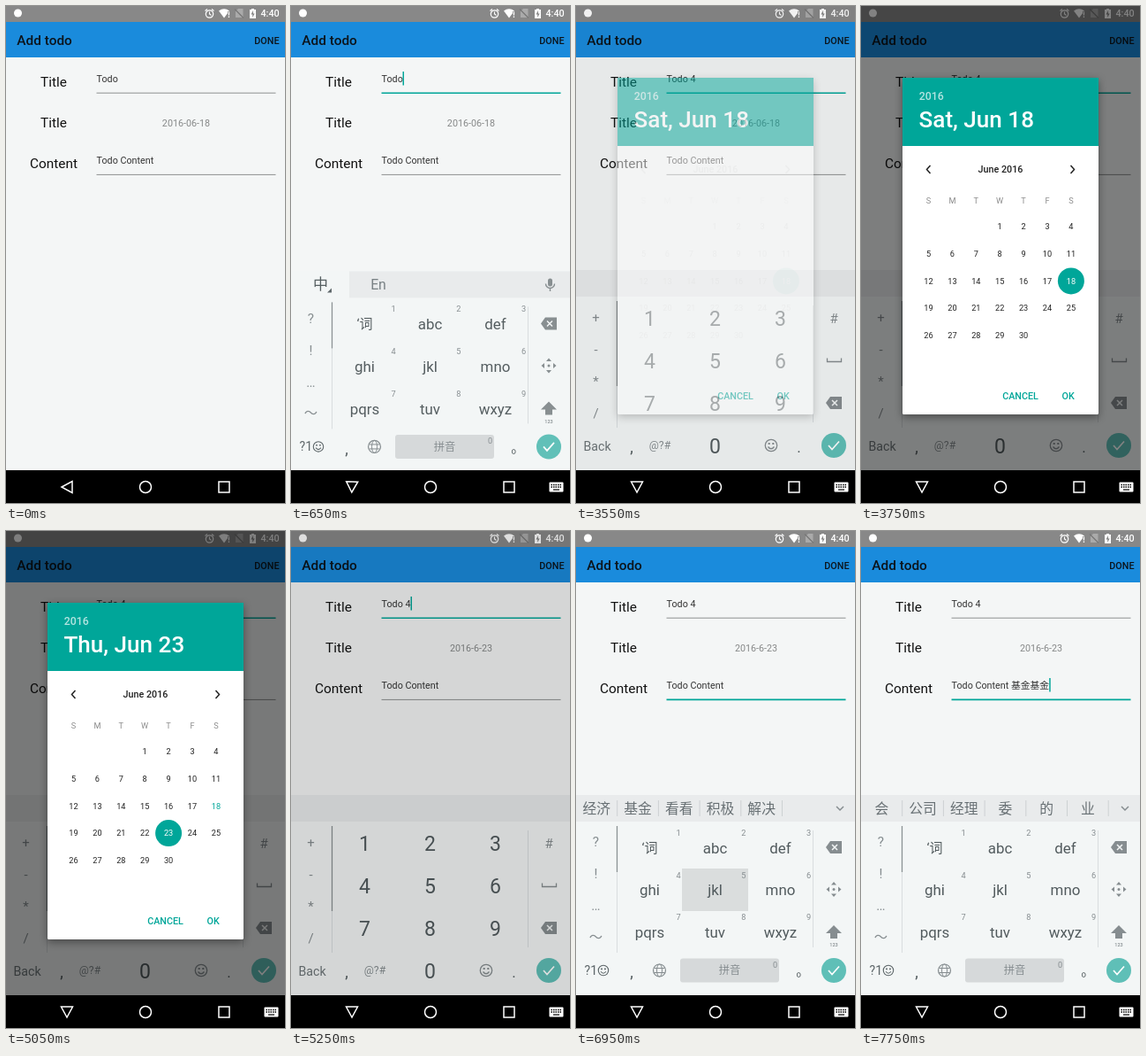
These frames come from a looping animation (316 by 561 pixels, 8 s). An HTML page:

```html
<!DOCTYPE html>
<html lang="zh-CN">
<head>
<meta charset="utf-8">
<title>Add todo</title>
<style>
html, body { margin: 0; width: 100%; height: 100%; overflow: hidden; background: #f4f6f6; }
svg { display: block; width: 100%; height: 100%; }
text { font-family: Roboto, 'Noto Sans CJK SC', 'Noto Sans CJK', sans-serif; white-space: pre; }
.line { fill: none; stroke: currentColor; }
#dialog { filter: drop-shadow(0 3px 5px rgba(0, 0, 0, .4)); }
</style>
</head>
<body>
<svg viewBox="0 0 316 561" preserveAspectRatio="none">
  <defs>
    <g id="check">
      <circle r="14" fill="#5fbfb7"/>
      <path class="line" d="M-6 0l4 4.500 8-9" color="#fff" stroke-width="1.700"/>
    </g>
    <g id="erase">
      <path d="M-9 0l5-7H9V7H-4z" fill="#868d90"/>
      <path class="line" d="M-2-3l6 6m0-6l-6 6" color="#f3f6f6" stroke-width="1.500"/>
    </g>
    <g id="smile">
      <circle class="line" r="6.700" stroke-width="1.300"/>
      <path class="line" d="M-3.500 1.500q3.500 4.500 7 0" stroke-width="1.300"/>
      <path d="M-3.300-3h2v2h-2zM1.300-3h2v2h-2z" fill="currentColor"/>
    </g>
  </defs>

  <rect width="316" height="561" fill="#f4f6f6"/>
  <rect width="316" height="18" fill="#888"/>
  <rect y="18" width="316" height="40" fill="#1a8bdc"/>
  <g id="status" color="#fff">
    <circle cx="13.500" cy="8" r="4.500" fill="#fff"/>
    <circle class="line" cx="230.500" cy="9" r="4.200" stroke-width="1.200"/>
    <path class="line" d="M230.500 6.500V9l2 1.500M225.500 5.500l2.500-2m7.500 2l-2.500-2" stroke-width="1.100"/>
    <path d="M241 5.500q6-4.500 12 0L247 13.500z" fill="#fff"/>
    <path d="M251 6h3v8h-3z" fill="#888"/>
    <path d="M251.800 6.500h1.300v4h-1.300zm0 5h1.300v1.400h-1.300z" fill="#fff"/>
    <path d="M260 6l3-3h5.500v10H260z" fill="#aaa"/>
    <path class="line" d="M259 3.500l10 10" color="#777" stroke-width="1.200"/>
    <path d="M276 4h2V3h3v1h2v10h-7z" fill="#fff"/>
    <path d="M280 5l-2.500 4.500h1.700V13l2.500-4.500H280z" fill="#888"/>
  </g>
  <g id="form"></g>
  <path id="titleLine"/><path id="bodyLine"/>
  <rect id="cursor" width="1.500" height="15.500" fill="#00a699"/>

  <g id="keyboard">
    <rect y="298" width="316" height="226" fill="#f3f6f6"/>
    <rect id="bar" y="298" width="316" height="30" fill="#e9ebec"/>
    <path d="M46.500 333V476M268.500 338V470" stroke="#d9dddf"/>
    <path id="thumb" stroke="#8b9294" stroke-width="1.300"/>
    <rect id="press" fill="#000" opacity=".1"/>
    <use href="#check" x="292" y="496"/>
    <g id="numbers">
      <path class="line" d="M284.500 397.500v4h16v-4" color="#868d90" stroke-width="1.300"/>
      <use href="#erase" x="292" y="448"/>
      <use href="#smile" x="221" y="496" color="#868d90"/>
    </g>
    <g id="pinyin" color="#868d90">
      <use href="#erase" x="292" y="357"/>
      <path d="M292 396l3 3.500h-6zm0 17l3-3.500h-6zM283.500 404.500l3.500-3v6zm17 0l-3.500-3v6z" fill="#868d90"/>
      <circle cx="292" cy="404.500" r="1.500" fill="#868d90"/>
      <path d="M292 445l9 9h-5v6h-8v-6h-5z" fill="#868d90"/>
      <use href="#smile" x="31" y="496" transform="translate(31 496) scale(.85) translate(-31 -496)" color="#5c6568"/>
      <g class="line">
        <circle cx="94.500" cy="496" r="7" stroke-width="1.200"/>
        <ellipse cx="94.500" cy="496" rx="3" ry="7"/>
        <path d="M88.500 493.500h12m-12 5h12"/>
      </g>
      <rect x="118" y="482.500" width="112" height="27" rx="3" fill="#d6d9da"/>
    </g>
    <g id="idle" color="#868d90">
      <path d="M46 317v5h-5z" fill="#5c6568"/>
      <rect x="291" y="306" width="5" height="9" rx="2.500" fill="#868d90"/>
      <path class="line" d="M288.500 312a5 5 0 0 0 10 0m-5 5v3.500" stroke-width="1.400"/>
    </g>
    <g id="words"></g>
  </g>

  <rect id="dim" width="316" height="524"/>
  <g id="dialog">
    <rect x="47" y="81" width="222" height="380" rx="1.500" fill="#fff"/>
    <rect x="47" y="81" width="222" height="77" fill="#00a699"/>
    <g id="calendar">
      <path class="line" d="M78.500 180l-4 4.500 4 4.500m159-9l4 4.500-4 4.500" color="#222" stroke-width="1.500"/>
      <circle id="pick" r="15" fill="#00a699"/>
    </g>
  </g>

  <rect y="524" width="316" height="37"/>
  <g color="#fff" stroke-width="1.500">
    <path id="back" class="line" d="M63 543l12-6.500v13z"/>
    <circle class="line" cx="158" cy="543" r="6.500"/>
    <rect class="line" x="241" y="537" width="12" height="12"/>
    <g id="keyIcon">
      <rect x="292.500" y="537.500" width="16" height="11" rx="1" fill="#fff"/>
      <path d="M294.500 540.500h12m-12 2.500h12" stroke="#000" stroke-dasharray="1.500 1"/>
      <path d="M297 546h7" stroke="#000" stroke-width="1.200"/>
    </g>
  </g>
</svg>
<script>
const LOOP = 8000, STEP = 50;
const TEAL = '#00a699', GREY = '#868d90', KEY = '#525b5e';
const $ = id => document.getElementById(id);

function add(parent, name, attrs) {
  const el = document.createElementNS('http://www.w3.org/2000/svg', name);
  for (const key in attrs) el.setAttribute(key, attrs[key]);
  return parent.appendChild(el);
}
function set(id, attrs) {
  for (const key in attrs) $(id).setAttribute(key, attrs[key]);
}
function show(id, visible) { $(id).style.display = visible ? '' : 'none'; }

// Text with its capitals centred on y.
function label(parent, str, x, y, size, fill, anchor = 'middle', weight = 400) {
  const el = add(parent, 'text', {
    x, y: y + size * .356, 'font-size': size, fill, 'text-anchor': anchor, 'font-weight': weight
  });
  el.textContent = str;
  return el;
}

// Status bar and form
const form = $('form');
label($('status'), '4:40', 288.5, 8.5, 10.76, '#fff', 'start', 500);
label(form, 'Add todo', 12.3, 38.5, 15.4, '#0c141b', 'start', 500);
label(form, 'DONE', 281.3, 39.3, 10.76, '#0c141b', 'start', 500);
['Title', 'Title', 'Content'].forEach((s, i) => label(form, s, 54, 86 + 46 * i, 15.4, '#111'));
const titleText = label(form, '', 102.6, 82.2, 10.76, '#333', 'start');
const dateText = label(form, '', 204, 132, 10.76, '#868888');
const bodyText = label(form, '', 102.6, 174.2, 10.76, '#333', 'start');

// Number layout
const numbers = $('numbers');
for (let n = 0; n < 9; n++) {
  label(numbers, n + 1, 83.5 + 74 * (n % 3), 353 + 47.8 * Math.floor(n / 3), 23, KEY);
}
label(numbers, '0', 157.5, 496.5, 23, KEY);
['+', '-', '*', '/'].forEach((s, i) => label(numbers, s, 22.5, 352 + 35.8 * i, 15, GREY));
label(numbers, '#', 292, 353, 15, GREY);
label(numbers, 'Back', 24, 496.5, 14.2, '#6d7578');
label(numbers, '@?#', 95, 496, 12.3, GREY);
label(numbers, '.', 252.5, 498, 17, KEY);

// Pinyin layout
const pinyin = $('pinyin');
'‘词 abc def ghi jkl mno pqrs tuv wxyz'.split(' ').forEach((s, n) => {
  const col = n % 3, row = Math.floor(n / 3);
  label(pinyin, s, 83.5 + 74 * col, 357.5 + 47.8 * row, n ? 16.9 : 15, KEY);
  label(pinyin, n + 1, 116 + 73.8 * col, 340.5 + 47.8 * row, 9.2, GREY);
});
['?', '!', '…', '～'].forEach((s, i) => label(pinyin, s, 22.5, 351 + 35.8 * i, 15.4, GREY));
label(pinyin, '?1', 9.5, 496, 14.2, '#5c6568', 'start');
label(pinyin, '拼音', 174, 496, 12.3, GREY);
label(pinyin, '0', 225.5, 489.500, 9.2, GREY);
label(pinyin, '。', 257, 497, 15.4, KEY);
label(pinyin, '123', 292, 467.5, 5.5, GREY, 'middle', 500);
[numbers, pinyin].forEach(g => label(g, ',', 63, 498, 18, KEY));
label($('idle'), '中', 33.5, 313, 17, KEY);
label($('idle'), 'En', 99, 313, 15.8, '#777f82');

// Date dialog
const dialog = $('dialog'), calendar = $('calendar');
label(dialog, '2016', 65.7, 102, 12.3, 'rgba(255,255,255,.7)', 'start', 500);
const heading = label(dialog, '', 65.5, 128, 26.1, '#fff', 'start', 500);
label(dialog, 'CANCEL', 180.5, 440, 10.76, TEAL, 'middle', 500);
label(dialog, 'OK', 234.7, 440, 10.76, TEAL, 'middle', 500);
label(calendar, 'June 2016', 158, 184.3, 10.76, '#222', 'middle', 500);
[...'SMTWTFS'].forEach((s, i) => label(calendar, s, 76.5 + 26.9 * i, 220, 9.2, '#8c8c8c'));
const dayAt = d => [76.5 + 26.9 * ((d + 2) % 7), 249 + 30.7 * Math.floor((d + 2) / 7)];
const days = [];
for (let d = 1; d <= 30; d++) days[d] = label(calendar, d, ...dayAt(d), 9.2, '#222');

// Timelines: [start, value]
const cursorOn = [[0, 0], [450, 1], [900, 0], [1400, 1], [1900, 0], [2400, 1], [3550, 0],
  [5200, 1], [6200, 0], [6350, 1], [6900, 0], [7400, 1]];
const cursorX = [[0, 126.5], [2650, 129.3], [2950, 135.5], [5700, 167.7], [6400, 170.4], [7700, 213.2]];
const titles = [[0, 'Todo'], [2650, 'Todo '], [2950, 'Todo 4']];
const bodies = [[0, 'Todo Content'], [6400, 'Todo Content '], [7700, 'Todo Content 基金基金']];
const candidates = [[0, ''], [6700, '就 看 可 了 来 家'], [6850, '经济 基金 看看 积极 解决'],
  [7000, '基金会 经济 基金 就 看'], [7150, '基金基金 经济 基金 就 看'], [7700, '会 公司 经理 委 的 业']];
const jkl = [120, 381, 75, 48];
const presses = [
  [1100, 1200, 0, 477, 46, 40], [2550, 2650, 269, 377, 45, 42], [2850, 3050, 46, 381, 74, 48],
  [6350, 6400, 118, 482, 112, 27], ...[6650, 6800, 6950, 7100].map(t => [t, t + 100, ...jkl]),
  [7650, 7700, 0, 298, 46, 30]
];

const latest = (list, t) => list.filter(e => e[0] <= t).pop()[1];
const ramp = (t, a, b) => Math.min(1, Math.max(0, (t - a) / (b - a)));

function drawWords(list) {
  const group = $('words');
  if (group.dataset.list === list) return;
  group.dataset.list = list;
  group.replaceChildren();
  if (!list) return;
  let x = 0;
  for (const word of list.split(' ')) {
    const width = Math.max(46.7, word.length * 16 + 14);
    if (x + width > 283) break;
    label(group, word, x + width / 2, 313, 15.8, '#687074');
    x += width;
    add(group, 'path', { d: `M${x} 304v18`, stroke: '#cdd1d3' });
  }
  add(group, 'path', { class: 'line', d: 'M295 311l4 4 4-4', color: GREY, 'stroke-width': 1.5 });
}

function underline(id, y, focused) {
  set(id, {
    d: `M102.500 ${y}H305.500`, stroke: focused ? TEAL : '#8f9191', 'stroke-width': focused ? 1.6 : 1
  });
}

function render(t) {
  const inBody = t >= 5700, numeric = t >= 1200 && !inBody;

  titleText.textContent = latest(titles, t);
  bodyText.textContent = latest(bodies, t);
  dateText.textContent = t < 5050 ? '2016-06-18' : '2016-6-23';
  underline('titleLine', 98.2, t >= 350 && !inBody);
  underline('bodyLine', 190.4, inBody);
  set('cursor', { x: latest(cursorX, t), y: inBody ? 166 : 74 });
  show('cursor', latest(cursorOn, t));

  const rise = 1 - (1 - ramp(t, 350, 700)) ** 2;
  set('keyboard', { transform: `translate(0 ${70 * (1 - rise)})`, opacity: rise });
  set('back', { transform: `rotate(${-90 * rise} 69 543)` });
  show('keyIcon', t >= 450);
  show('numbers', numeric);
  show('pinyin', !numeric);
  set('thumb', { d: numeric ? 'M46.500 333V429' : 'M46.500 333V385' });

  const list = latest(candidates, t), idle = !numeric && !list;
  show('idle', idle);
  set('bar', { x: idle ? 66 : 0 });
  drawWords(list);

  const press = presses.find(p => t >= p[0] && t < p[1]);
  show('press', press);
  if (press) {
    const [x, y, width, height] = press.slice(2);
    set('press', { x, y, width, height });
  }

  const open = t >= 3550 && t < 5250;
  set('dim', { opacity: .6 * Math.min(ramp(t, 3525, 3800), 1 - ramp(t, 5000, 5320)) });
  show('dialog', open);
  if (!open) return;
  set('dialog', { opacity: Math.min(ramp(t, 3500, 3600), 1 - ramp(t, 5050, 5200)) });
  set('calendar', { opacity: ramp(t, 3540, 3700) });
  const day = t < 4500 ? 18 : 23, [cx, cy] = dayAt(day);
  heading.textContent = day === 18 ? 'Sat, Jun 18' : 'Thu, Jun 23';
  set('pick', { cx, cy });
  days[18].setAttribute('fill', day === 18 ? '#fff' : TEAL);
  days[23].setAttribute('fill', day === 23 ? '#fff' : '#222');
}

const start = performance.now();
function tick() {
  const t = (performance.now() - start) % LOOP;
  render(Math.floor(t / STEP) * STEP);
  requestAnimationFrame(tick);
}
tick();
</script>
</body>
</html>
```
